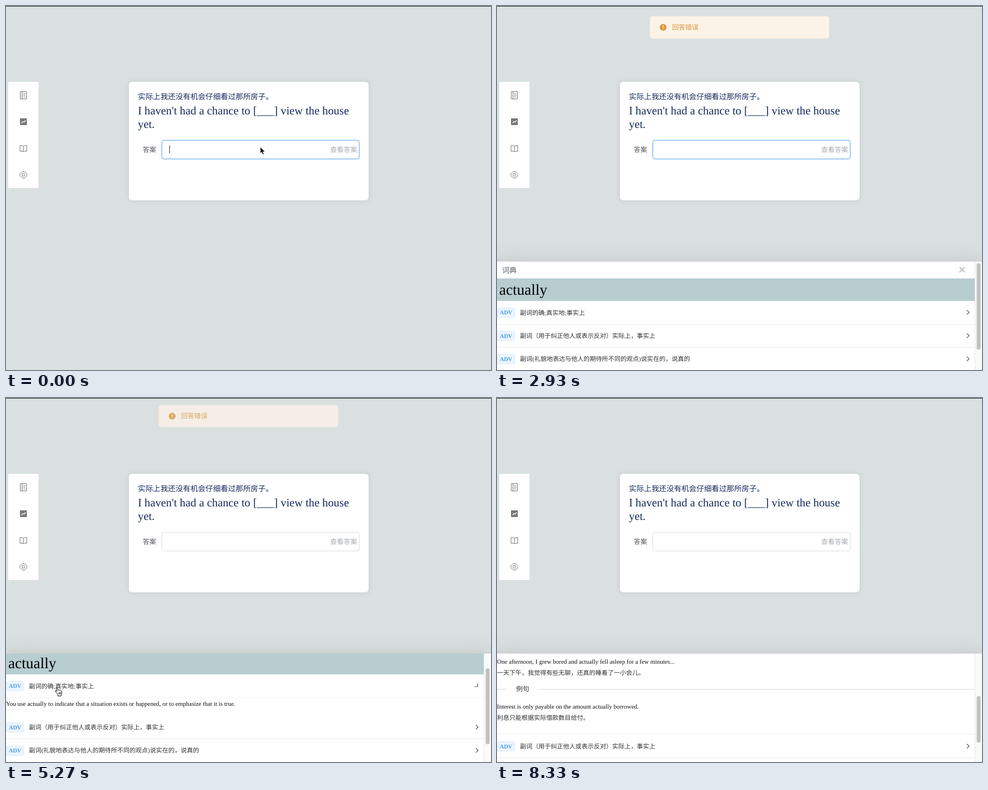
Animation, 864 px wide and 648 px high, one loop 8990 ms. Source, as an HTML page:

```html
<!DOCTYPE html>
<html lang="zh">
<head>
<meta charset="utf-8">
<style>
  html, body { margin: 0; width: 100%; height: 100%; overflow: hidden; background: #dae0e0; }
  #stage { position: absolute; left: 0; top: 0; width: 864px; height: 648px; overflow: hidden; }
  #stage > * { position: absolute; }
  svg { display: block; }
  text { font-family: "Liberation Serif", "Noto Sans CJK SC", "Noto Sans CJK", serif; white-space: pre; text-rendering: geometricPrecision; }
  .sans { font-family: "Liberation Sans", "Noto Sans CJK SC", sans-serif; }
  #edge { left: 0; top: 0; width: 864px; height: 1px; background: #2b2e2e; }
  #side { left: 4px; top: 135px; width: 54px; height: 189px; background: #fff; }
  #card { left: 219px; top: 135px; width: 427px; height: 211px; border-radius: 6px; background: #fff; box-shadow: 0 0 10px rgba(0,0,0,.1); }
  #drawer { left: 0; top: 455px; width: 864px; height: 193px; background: #fff;
    box-shadow: 0 14px 41px 14px rgba(0,0,0,.08), 0 10px 28px rgba(0,0,0,.12), 0 7px 14px -7px rgba(0,0,0,.16); }
  #msg { left: 272px; top: 18px; }
</style>
</head>
<body>
<div id="stage">
  <div id="side"></div>
  <div id="card"></div>
  <svg id="page" width="864" height="648"></svg>
  <div id="drawer"><svg id="dict" width="864" height="193"></svg></div>
  <svg id="msg" width="320" height="40"></svg>
  <div id="edge"></div>
  <svg id="pointer" width="864" height="648">
    <g id="arrow"><path d="M0 0V11.6L2.7 9.2L4.6 13.4L6.6 12.5L4.8 8.4H8.4Z" fill="#000" stroke="#fff" stroke-width=".8"/></g>
    <g id="hand"><path transform="translate(-4 -1)" d="M3.6 10.5L.9 7.2Q.3 5.6 1.9 5.9L3.6 7.2L2.6 2Q2.6.6 3.7.7Q4.6.8 5 2.2L5.8 5Q7 4.2 7.8 5.2Q9 4.6 9.8 5.8Q11.6 5.4 12 7.2L12.4 10Q12.3 12 11.3 13V15.5H5.3V13.2ZM7 9v3M8.7 9v3M10.3 9v3" fill="#fff" stroke="#111"/></g>
    <g id="beam"><path d="M-2.5-6.5Q0-6.5 0-5Q0-6.5 2.5-6.5M0-5V5M-2.5 6.5Q0 6.5 0 5Q0 6.5 2.5 6.5M-1.3 2.5h2.6" fill="none" stroke="#222" stroke-width="1.1"/></g>
  </svg>
</div>
<script>
const $ = id => document.getElementById(id);
const LOOP = 8990, VIEW = 193, ROW = 41.4, DETAIL = 202;
const SUBMIT = 2200, CLICK = 5188, MSG_OUT = 5220;

// Text whose middle line is at cy
const text = (x, cy, size, color, str, attrs = '') =>
  `<text x="${x}" y="${cy + size * .3375}" font-size="${size}" fill="${color}" ${attrs}>${str}</text>`;
const line = (x1, x2, y, color) => `<path d="M${x1} ${y}H${x2}" stroke="${color}"/>`;

$('page').innerHTML = `
  <g fill="none" stroke="#777">
    <path d="M25.5 152.5h11v13h-11zM28.5 152.5v13M30.5 156h4M30.5 159h4M30.5 162h4"/>
    <rect x="25.5" y="200.5" width="11" height="11" fill="#777"/>
    <path d="M27.5 208.5l2.5-3 2 1.5 3-3.5" stroke="#fff" stroke-width="1.2"/>
    <path d="M31 249.5Q30 248.5 28.5 248.5H25V258.5H28.5Q30 258.5 31 259.5Q32 258.5 33.5 258.5H37V248.5H33.5Q32 248.5 31 249.5V259.5"/>
    <path d="M28.5 295.2Q31 294 33.5 295.2L35 296.8Q37.5 298 37.3 300.5Q37.5 303 35 304.2L33.5 305.8Q31 307 28.5 305.8L27 304.2Q24.5 303 24.7 300.5Q24.5 298 27 296.8Z"/>
    <circle cx="31" cy="300.5" r="2.6"/>
  </g>
  ${text(235, 161.4, 13.4, '#142a5c', '实际上我还没有机会仔细看过那所房子。')}
  ${text(235, 186.3, 20.3, '#142a5c', "I haven't had a chance to [___] view the house")}
  ${text(235, 210.3, 20.3, '#142a5c', 'yet.')}
  ${text(243.5, 255.5, 12, '#55585c', '答案')}
  <rect id="input" x="277.6" y="239.1" width="351.6" height="33.2" rx="3.5" fill="#fff"/>
  ${text(577.6, 255.5, 12, '#a8abb2', '查看答案')}
  ${text(290.5, 255.5, 12.1, '#4c4e52', '', 'id="typed" class="sans"')}
  <rect id="caret" y="248" width="1" height="14" fill="#333"/>`;

$('msg').innerHTML = `
  <rect x=".5" y=".5" width="319" height="39" rx="3.5" fill="#fcf3e8" stroke="#faead6"/>
  <circle cx="24" cy="20" r="6" fill="#de973a"/>
  <path d="M24 16.5v4.2M24 22v1.4" stroke="#fff" stroke-width="1.2"/>
  ${text(39.7, 20, 11.8, '#d9943a', '回答错误')}`;

const row = (i, str) => {
  const top = 70 + ROW * i, mid = top + 20.9;
  return `<rect x=".5" y="${mid - 8.5}" width="31" height="17" rx="3" fill="#ecf5ff" stroke="#d9ecff"/>
    ${text(5, mid, 10.3, '#4a9be8', 'ADV', 'font-weight="bold"')}
    ${text(41, mid, 10.96, '#303133', str)}
    <path class="chev" d="M-2-4L2 0L-2 4" transform="translate(839 ${mid - .5})" fill="none" stroke="#44474b" stroke-width="1.1"/>
    <g class="rule">${line(0, 851, Math.floor(top + ROW) + .5, '#e8ebf0')}</g>`;
};
const example = (y, en, zh) => `
  ${line(0, 17, y, '#d6d8dd')}${line(74, 851, y, '#d6d8dd')}
  ${text(34, y, 11.7, '#303133', '例句', 'font-weight="500"')}
  ${text(0, y + 31, 10.98, '#111', en)}
  ${text(0, y + 51, 10.96, '#303133', zh)}`;

$('dict').innerHTML = `
  <g id="scroll">
    ${text(9, 15.5, 13, '#5c6066', '词典')}
    <path d="M824 10l9 9m0-9l-9 9" stroke="#666"/>
    <rect y="30" width="851.5" height="40" fill="#b8cdd0"/>
    ${text(4, 49.7, 27, '#000', 'actually')}
    ${row(0, '副词的确;真实地;事实上')}
    <svg id="detail" y="111.5" width="864">
      ${text(0, 10.8, 10.98, '#111', 'You use actually to indicate that a situation exists or happened, or to emphasize that it is true.')}
      ${example(41, 'One afternoon, I grew bored and actually fell asleep for a few minutes...', '一天下午，我觉得有些无聊，还真的睡着了一小会儿。')}
      ${example(121, 'Interest is only payable on the amount actually borrowed.', '利息只能根据实际借款数目给付。')}
      ${line(0, 851, 201.5, '#e8ebf0')}
    </svg>
    <g id="rest">
      ${row(1, '副词（用于纠正他人或表示反对）实际上，事实上')}
      ${row(2, '副词(礼貌地表达与他人的期待所不同的观点)说实在的，说真的')}
      ${row(3, '副词（引入新话题）其实，说实在的')}
    </g>
  </g>
  <rect x="851.5" y="-1" width="14" height="196" fill="#fafafa" stroke="#e8e8e8"/>
  <rect id="thumb" x="854.5" width="7" rx="3.5" fill="#c1c1c1"/>`;

const clamp = v => Math.max(0, Math.min(1, v));
// CSS cubic-bezier, solved by bisection
const bezier = (x1, y1, x2, y2) => p => {
  const at = (a, b, u) => 3 * a * u * (1 - u) ** 2 + 3 * b * u * u * (1 - u) + u ** 3;
  let lo = 0, hi = 1;
  for (let i = 0; i < 20; i++) {
    const mid = (lo + hi) / 2;
    at(x1, x2, mid) < p ? lo = mid : hi = mid;
  }
  return at(y1, y2, lo);
};
const ease = bezier(.25, .1, .25, 1), easeInOut = bezier(.42, 0, .58, 1);
const tween = (t, start, dur, curve = ease) => curve(clamp((t - start) / dur));

// Keys are [time, ...values]; moves between them are smoothed
const track = (t, keys) => {
  const i = keys.findIndex(k => k[0] > t);
  if (i < 1) return keys.at(i < 0 ? -1 : 0).slice(1);
  const [a, b] = [keys[i - 1], keys[i]];
  const p = easeInOut((t - a[0]) / (b[0] - a[0]));
  return a.slice(1).map((v, j) => v + (b[j + 1] - v) * p);
};
const path = [[3470, 453, 251], [3770, 237, 572], [4400, 237, 572], [5000, 91, 516],
  [5500, 91, 516], [6100, 136, 562], [7050, 136, 562], [7400, 111, 566]];
const scrolls = [[3700, 0], [4050, 33], [6270, 33], [6800, 98], [7000, 98], [7400, 169]];
const keyTimes = [930, 1130, 1400, 1600];
const caretTimes = [[0, 70], [600, 2130], [SUBMIT, 2740], [3270, 3800], [4330, 4860]];

const chev = document.querySelector('.chev'), rule = document.querySelector('.rule');
const chevPlace = chev.getAttribute('transform');

function draw(t) {
  const word = t < SUBMIT ? 'abcd'.slice(0, keyTimes.filter(k => t >= k).length) : '';
  $('typed').textContent = word;
  $('caret').setAttribute('x', 291 + Math.round(word ? $('typed').getComputedTextLength() : 0));
  $('caret').style.opacity = +caretTimes.some(([a, b]) => t >= a && t < b);
  $('input').setAttribute('stroke', t < CLICK ? '#4a9ef5' : '#d9dce2');

  const shown = t < MSG_OUT;
  const from = shown ? SUBMIT : MSG_OUT;
  const level = d => shown ? tween(t, from, d) : 1 - tween(t, from, d);
  $('msg').style.opacity = level(300);
  $('msg').style.transform = `translateY(${40 * (level(400) - 1)}px)`;

  const opened = tween(t, 2070, 300);
  $('drawer').style.visibility = t < 2070 ? 'hidden' : 'visible';
  $('drawer').style.transform = `translateY(${VIEW * (1 - opened)}px)`;

  const grow = DETAIL * tween(t, CLICK, 300, easeInOut);
  const turn = tween(t, CLICK, 300);
  const [scroll] = track(t, scrolls);
  $('scroll').setAttribute('transform', `translate(0 ${-scroll})`);
  $('detail').setAttribute('height', grow);
  $('rest').setAttribute('transform', `translate(0 ${grow})`);
  chev.setAttribute('transform', `${chevPlace} rotate(${90 * turn})`);
  rule.style.opacity = 1 - turn;

  const full = 236 + grow, size = 188 * VIEW / full;
  $('thumb').setAttribute('height', size);
  $('thumb').setAttribute('y', 3 + scroll * (188 - size) / (full - VIEW));

  const [x, y] = track(t, path);
  const visible = t < 930 || t >= 3470 && t < 7800;
  const shape = !visible ? '' : t >= 5600 ? 'beam' : y > 490 ? 'hand' : 'arrow';
  for (const id of ['arrow', 'hand', 'beam']) {
    $(id).style.display = id === shape ? '' : 'none';
    $(id).setAttribute('transform', `translate(${x} ${y})`);
  }
}

const start = performance.now();
function frame() {
  draw((performance.now() - start) % LOOP);
  requestAnimationFrame(frame);
}
frame();
</script>
</body>
</html>
```
